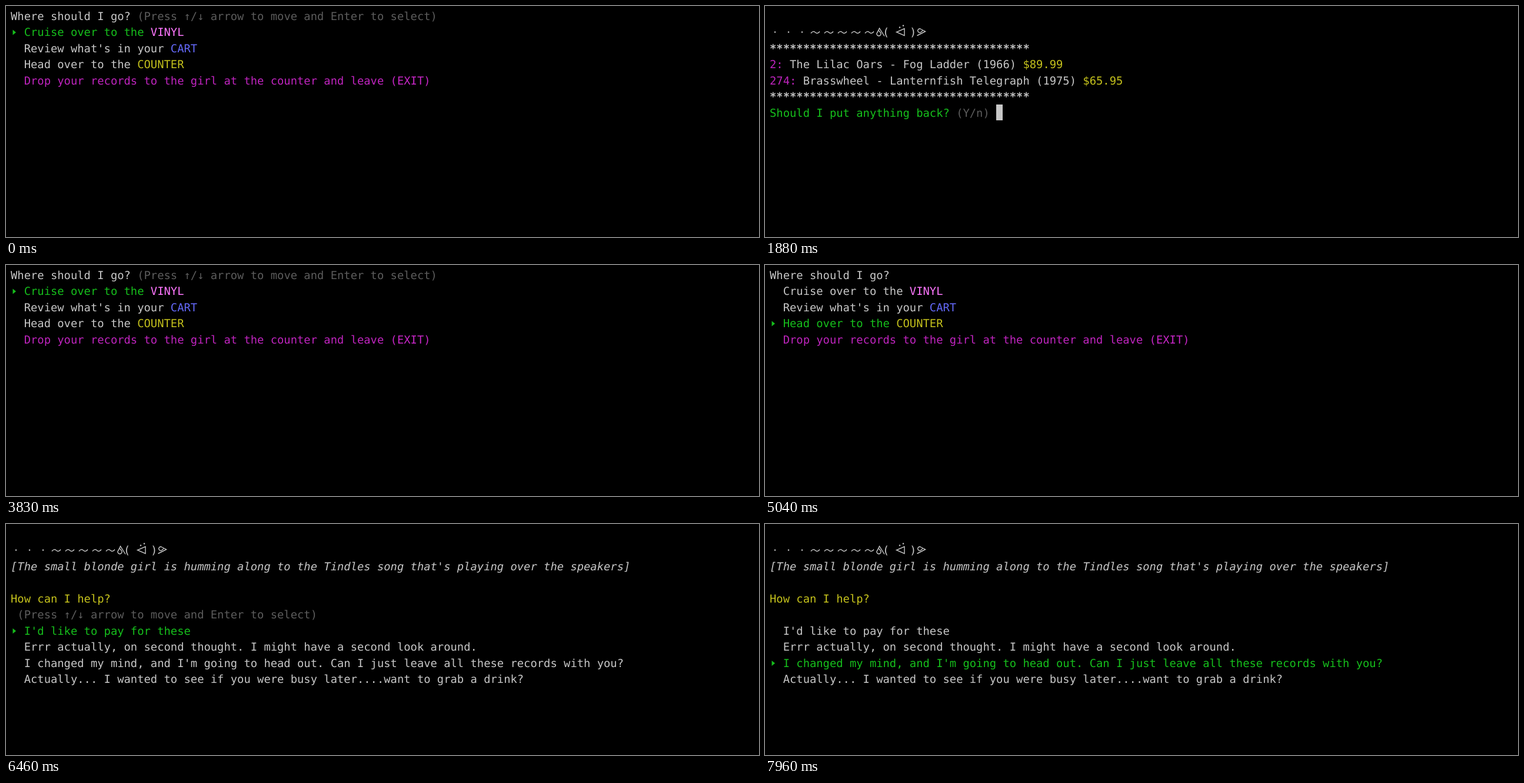
An HTML page that plays this animation: 1280 px wide and 394 px high, repeating every 8000 ms.

```html
<!DOCTYPE html>
<html lang="en">
<head>
<meta charset="utf-8">
<title>Record shop prompt</title>
<style>
  html, body { margin: 0; width: 100%; height: 100%; overflow: hidden; background: #000; }
  svg { display: block; width: 1280px; height: 394px; }
  text {
    font: 18.82px "DejaVu Sans Mono", "Noto Sans Mono", monospace;
    white-space: pre;
    text-rendering: geometricPrecision;
  }
  .italic { font-style: italic; }
  .rule { stroke: #c7c7c7; stroke-width: 0.5; }
  .stroke { fill: none; stroke: #c7c7c7; stroke-width: 1.4; }
</style>
</head>
<body>
<svg id="screen" viewBox="0 0 1280 394"></svg>
<script>
const LOOP = 8000, LEFT = 8, ROW = 27.5, BASE = 23.6;
const WHITE = '#c7c7c7', GREEN = '#16bf1c', YELLOW = '#c5c21c', GREY = '#5c5c5c',
      MAGENTA = '#bf24be', PINK = '#ff76ff', BLUE = '#6469fa';
const HINT = '(Press ↑/↓ arrow to move and Enter to select)';

// A line is a row number followed by [text, colour, class] parts.
const line = (row, ...parts) =>
  `<text x="${LEFT}" y="${BASE + row * ROW}">` +
  parts.map(([text, fill, cls = '']) => `<tspan fill="${fill}" class="${cls}">${text}</tspan>`).join('') +
  '</text>';

const pointer = row => {
  const y = 17.6 + row * ROW;
  return `<path fill="${GREEN}" d="M11.5 ${y - 4.5}l5.5 4.5l-5.5 4.5z"/>`;
};

// Options are [text, keyword, keyword colour, base colour].
const options = (first, selected, list) =>
  list.map(([text, word = '', wordFill = WHITE, fill = WHITE], i) =>
    line(first + i, ['  ' + text, i === selected ? GREEN : fill], [word, wordFill])
  ).join('') + pointer(first + selected);

const dot = (x, y) => `<circle cx="${x}" cy="${y}" r="1.2" fill="${WHITE}"/>`;

const bird = () => {
  const dots = [0, 1, 2].map(i => dot(17 + 23 * i, 44.5));
  const waves = [0, 1, 2, 3, 4].map(i => `M${78 + 23 * i} 46.5q3.8 -5 7.5 -1.5t7.5 -1.5`);
  const arms = 'M203 51.5L194.5 38L191 45a3.4 3.6 0 1 0 5 0L193.5 42' +
               'M258.5 50.5L272.5 43.5L265 39.5a3.3 3.2 0 1 0 0 5.2L268 42';
  const beak = 'M237 38.5V50.5L223.5 44.5Z';
  return dots.join('') + `<path class="stroke" d="${waves.join('')}${arms}${beak}"/>` +
    dot(229, 36.5) + dot(235, 33.5) +
    `<text y="50.5" fill="${WHITE}"><tspan x="200">(</tspan><tspan x="246">)</tspan></text>`;
};

const menu = (selected, hint = '') =>
  line(0, ['Where should I go? ', WHITE], [hint, GREY]) +
  options(1, selected, [
    ['Cruise over to the ', 'VINYL', PINK],
    ["Review what's in your ", 'CART', BLUE],
    ['Head over to the ', 'COUNTER', YELLOW],
    ['Drop your records to the girl at the counter and leave ', '(EXIT)', '#c826c7', MAGENTA],
  ]);

const cart = () => {
  const rule = ['*'.repeat(39), WHITE, 'rule'];
  return bird() + line(2, rule) +
    line(3, ['2:', MAGENTA], [' The Lilac Oars - Fog Ladder (1966) ', WHITE], ['$89.99', YELLOW]) +
    line(4, ['274:', MAGENTA], [' Brasswheel - Lanternfish Telegraph (1975) ', WHITE], ['$65.95', YELLOW]) +
    line(5, rule) +
    line(6, ['Should I put anything back? ', GREEN], ['(Y/n)', GREY]) +
    `<rect x="393" y="168" width="11" height="27" fill="${WHITE}"/>`;
};

const counter = (selected, hint = '') =>
  bird() +
  line(2, ["[The small blonde girl is humming along to the Tindles song that's playing over the speakers]", WHITE, 'italic']) +
  line(4, ['How can I help?', YELLOW]) +
  line(5, [' ' + hint, GREY]) +
  options(6, selected, [
    ["I'd like to pay for these"],
    ['Errr actually, on second thought. I might have a second look around.'],
    ["I changed my mind, and I'm going to head out. Can I just leave all these records with you?"],
    ['Actually... I wanted to see if you were busy later....want to grab a drink?'],
  ]);

const timeline = [
  [0, menu(0, HINT)],
  [200, menu(1)],
  [830, ''],
  [880, cart()],
  [3000, menu(0, HINT)],
  [4440, menu(1)],
  [4760, menu(2)],
  [5500, ''],
  [5540, counter(0, HINT)],
  [6600, counter(1)],
  [6880, counter(2)],
];

const screen = document.getElementById('screen');
const start = performance.now();
let shown = -1;

function draw() {
  const time = (performance.now() - start) % LOOP;
  const step = timeline.findLastIndex(([at]) => at <= time);
  if (step !== shown) {
    screen.innerHTML = timeline[step][1];
    shown = step;
  }
  requestAnimationFrame(draw);
}
draw();
</script>
</body>
</html>
```
